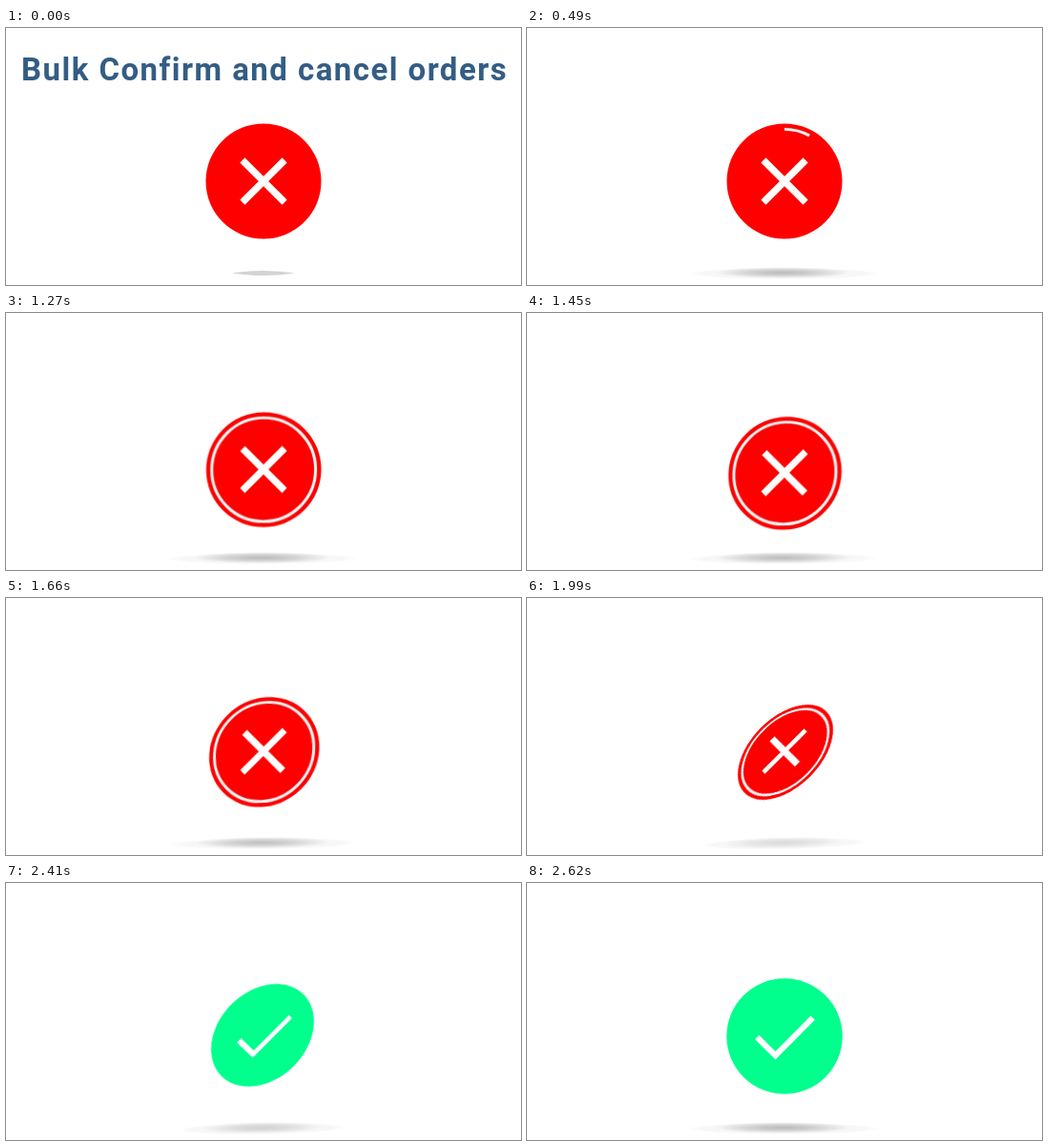
Animation of 540 by 270 pixels, one loop 2.65 s. Source, as an HTML page:

```html
<!DOCTYPE html>
<html lang="en">
<head>
<meta charset="utf-8">
<title>Bulk Confirm and cancel orders</title>
<style>
  html, body { margin: 0; width: 100%; height: 100%; overflow: hidden; background: #fff; }
  .stage { position: relative; width: 540px; height: 270px; overflow: hidden; --loop: 2650ms linear infinite; }
  .layer { position: absolute; left: 0; top: 0; width: 540px; height: 270px; }
  .intro { animation: intro var(--loop); }
  .later { animation: later var(--loop); }
  .title { font: 600 33px Roboto, sans-serif; letter-spacing: 1.45px; fill: #335d85; }

  .shadow { transform-origin: 269px 257.5px; animation: shadow var(--loop); }
  .core { animation: fade var(--loop); }

  .badge {
    position: absolute; left: 208px; top: 98.7px; width: 124px; height: 124px;
    perspective: 1250px; animation: dip var(--loop);
  }
  .coin { width: 100%; height: 100%; transform-style: preserve-3d; animation: flip var(--loop); }
  .face { position: absolute; inset: 0; width: 124px; height: 124px; overflow: visible; backface-visibility: hidden; }
  .back { transform: rotate3d(1, -1, 0, 180deg); }
  .mark { fill: none; stroke: #fff; }
  .ring circle { fill: none; stroke-dasharray: 1 2; animation: draw var(--loop); }

  @keyframes intro {
    0% { opacity: 1; animation-timing-function: step-end; }
    4.9%, 100% { opacity: 0; }
  }
  @keyframes later {
    0% { opacity: 0; animation-timing-function: step-end; }
    4.9%, 100% { opacity: 1; }
  }
  @keyframes draw {
    0%, 12.83% { stroke-dashoffset: 1; animation-timing-function: cubic-bezier(.455, .03, .515, .955); }
    41.89%, 100% { stroke-dashoffset: 0; }
  }
  @keyframes dip {
    0%, 43.96% { transform: translateY(0); animation-timing-function: ease-in-out; }
    52.45% { transform: translateY(7.5px); animation-timing-function: ease-in-out; }
    63.4%, 100% { transform: translateY(0); }
  }
  @keyframes flip {
    0%, 44.15% { transform: rotate3d(1, -1, 0, 0deg); }
    49.06% { transform: rotate3d(1, -1, 0, 8deg); }
    54.72% { transform: rotate3d(1, -1, 0, 16deg); }
    62.64% { transform: rotate3d(1, -1, 0, 25deg); }
    64.9% { transform: rotate3d(1, -1, 0, 27.5deg); }
    69.8% { transform: rotate3d(1, -1, 0, 37deg); }
    75.09% { transform: rotate3d(1, -1, 0, 53deg); }
    79.62% { transform: rotate3d(1, -1, 0, 74deg); }
    84.15% { transform: rotate3d(1, -1, 0, 97.5deg); }
    88.68% { transform: rotate3d(1, -1, 0, 125deg); }
    93.2% { transform: rotate3d(1, -1, 0, 153deg); }
    96.6% { transform: rotate3d(1, -1, 0, 171deg); }
    98.86%, 100% { transform: rotate3d(1, -1, 0, 180deg); }
  }
  @keyframes shadow {
    0%, 44.15% { transform: rotate(0deg) scaleX(1); }
    62.64% { transform: rotate(-.5deg) scaleX(.98); }
    75.09% { transform: rotate(-1.2deg) scaleX(.87); }
    82.5%, 84.15% { transform: rotate(-2deg) scaleX(.65); }
    93.2% { transform: rotate(-.5deg) scaleX(.95); }
    98.86%, 100% { transform: rotate(0deg) scaleX(1); }
  }
  @keyframes fade {
    0%, 44.15% { opacity: 1; }
    62.64% { opacity: .9; }
    75.09% { opacity: .45; }
    82.5%, 84.15% { opacity: .06; }
    93.2% { opacity: .8; }
    98.86%, 100% { opacity: 1; }
  }
</style>
</head>
<body>
<div class="stage">
  <svg class="layer intro" viewBox="0 0 540 270">
    <text class="title" x="16" y="55">Bulk Confirm and cancel orders</text>
    <path d="M237 257.5Q253 255 270 255T303 257.5Q287 260 270 260T237 257.5Z" fill="#d3d3d3"/>
  </svg>

  <svg class="layer later" viewBox="0 0 540 270">
    <defs>
      <radialGradient id="core">
        <stop offset="0" stop-opacity=".24"/>
        <stop offset=".45" stop-opacity=".16"/>
        <stop offset="1" stop-opacity="0"/>
      </radialGradient>
      <radialGradient id="haze">
        <stop offset="0" stop-opacity=".04"/>
        <stop offset=".85" stop-opacity=".03"/>
        <stop offset="1" stop-opacity="0"/>
      </radialGradient>
    </defs>
    <g class="shadow">
      <ellipse cx="269" cy="258" rx="101" ry="6" fill="url(#haze)"/>
      <ellipse class="core" cx="268" cy="257" rx="72" ry="6" fill="url(#core)"/>
    </g>
  </svg>

  <div class="badge">
    <div class="coin">
      <svg class="face" viewBox="-62 -62 124 124">
        <circle r="60.5" fill="#f00"/>
        <g class="ring" transform="rotate(-90)">
          <circle r="54.6" pathLength="1" stroke="#b66" stroke-opacity=".4" stroke-width="4.4"/>
          <circle r="54.6" pathLength="1" stroke="#f6f0f0" stroke-width="2.9"/>
        </g>
        <path class="mark" d="M-22.1-22.1 22.1 22.1M-22.1 22.1 22.1-22.1" stroke-width="7.2"/>
      </svg>
      <svg class="face back" viewBox="-62 -62 124 124">
        <circle r="60.7" fill="#00ff8c"/>
        <path class="mark" d="M-28.8 1-9.5 20.2 29.7-19.4" stroke-width="6.2"/>
      </svg>
    </div>
  </div>
</div>
</body>
</html>
```
